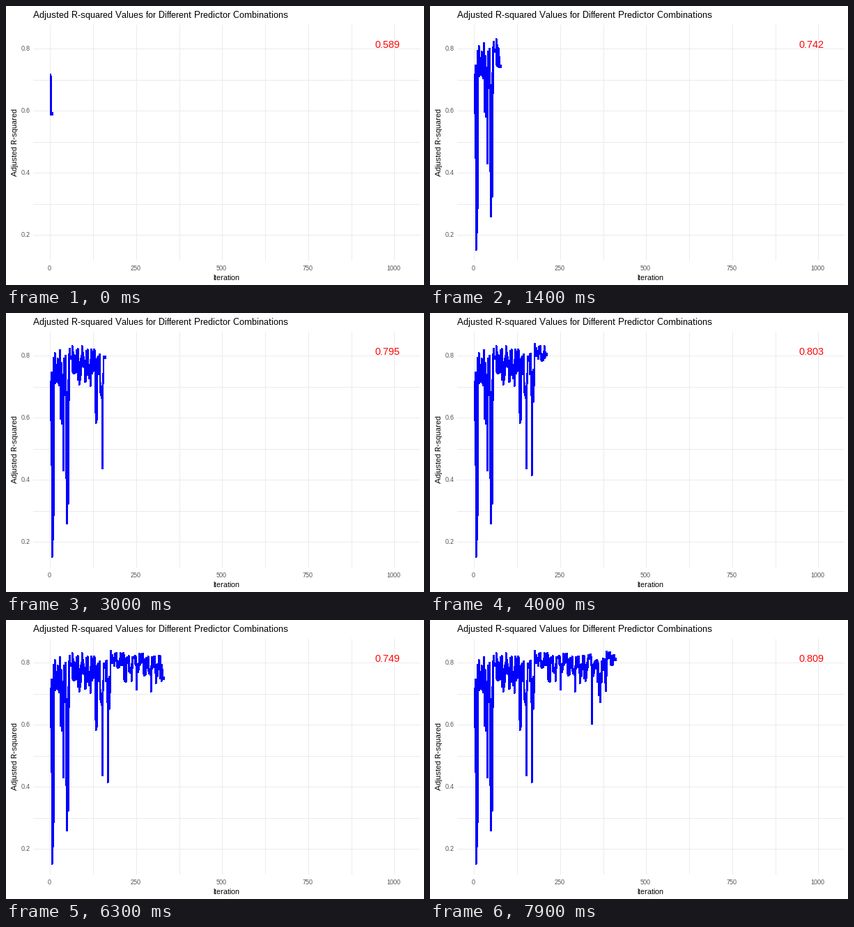
These frames come from a looping animation (600 by 400 pixels, 8000 ms). A matplotlib script:

```python
from itertools import chain, combinations, islice

import matplotlib.pyplot as plt
import numpy as np
from matplotlib.animation import FuncAnimation
from matplotlib.patches import Circle

W, H, DPI = 600, 400, 100
FRAMES, INTERVAL = 80, 100
OBS = 32

plt.rcParams.update({
    "font.family": ["Liberation Sans", "DejaVu Sans"],
    "text.hinting": "native",
    "text.hinting_factor": 1,
    "path.simplify": False,
})

# Two-factor model: each predictor's correlation with the response,
# and its loading on a second factor unrelated to the response.
PULL = np.array([-.852, -.848, -.776, .681, -.868, .419, .664, .600, .480, -.551])
SIDE = np.array([.07, -.08, .41, .45, -.23, -.75, -.38, .70, .75, .67])
SHARED = 0.9                       # response variance the first factor explains
N = len(PULL)
STEP = (2 ** N - 2) / 199          # fits revealed per frame

corr = np.outer(PULL, PULL) / SHARED + np.outer(SIDE, SIDE)
np.fill_diagonal(corr, 1)


def adj_r2(subset):
    s = list(subset)
    r2 = PULL[s] @ np.linalg.solve(corr[np.ix_(s, s)], PULL[s])
    return 1 - (1 - r2) * (OBS - 1) / (OBS - 1 - len(s))


def head(k):
    """Number of fits shown in frame k."""
    return int(1 + (k + 0.5) * STEP)


def px(i):
    return np.round(63.3 + 0.494 * i)


def py(v):
    return np.round(60.3 + (0.8 - v) * 444.5)


subsets = chain.from_iterable(combinations(range(N), n) for n in range(1, N + 1))
fits = np.array([adj_r2(s) for s in islice(subsets, head(FRAMES - 1))])
xs, ys = px(np.arange(1, len(fits) + 1)), py(fits)

fig = plt.figure(figsize=(W / DPI, H / DPI), dpi=DPI, facecolor="white")
ax = fig.add_axes([0, 0, 1, 1])
ax.set_xlim(0, W)
ax.set_ylim(H, 0)
ax.axis("off")


def pt(pixels):
    return pixels * 72 / DPI


def text(x, y, s, size, color="black", ha="center", **kw):
    return ax.text(x, y, s, fontsize=pt(size), color=color, ha=ha,
                   va="baseline", **kw)


def path(x, y, color, width, **kw):
    return ax.plot(x, y, color=color, lw=pt(width), antialiased=False,
                   solid_capstyle="butt", solid_joinstyle="bevel", **kw)[0]


for i in range(0, 1001, 125):
    x = px(i)
    path([x, x], [27, 364], "#EBEBEB", 1)
    if i % 250 == 0:
        text(x - 0.5, 379, str(i), 9, "#4D4D4D")

for tenth in range(2, 9):
    y = py(tenth / 10)
    path([39, 594], [y + 1, y + 1], "#EBEBEB", 1)
    if tenth % 2 == 0:
        text(35, y + 4, f"{tenth / 10:.1f}", 9, "#4D4D4D", "right")

text(39, 17, "Adjusted R-squared Values for Different Predictor Combinations",
     13, ha="left")
text(316.5, 393, "Iteration", 11)
text(16, 196, "Adjusted R-squared", 11, rotation=90, rotation_mode="anchor")

line = path([], [], "#0000FF", 2, zorder=3, snap=False)
dot = ax.add_patch(Circle((0, 0), 2.5, fc="#0000FF", ec="none",
                          antialiased=False, zorder=4))
label = text(547, 60, "", 14, "#FF0000", zorder=5)


def draw(k):
    n = head(k)
    line.set_data(xs[:n], ys[:n])
    dot.center = xs[n - 1] + 0.5, ys[n - 1] + 0.5
    label.set_text(f"{fits[n - 1]:.3f}")
    return line, dot, label


anim = FuncAnimation(fig, draw, frames=FRAMES, interval=INTERVAL, repeat=True)
plt.show()
```
